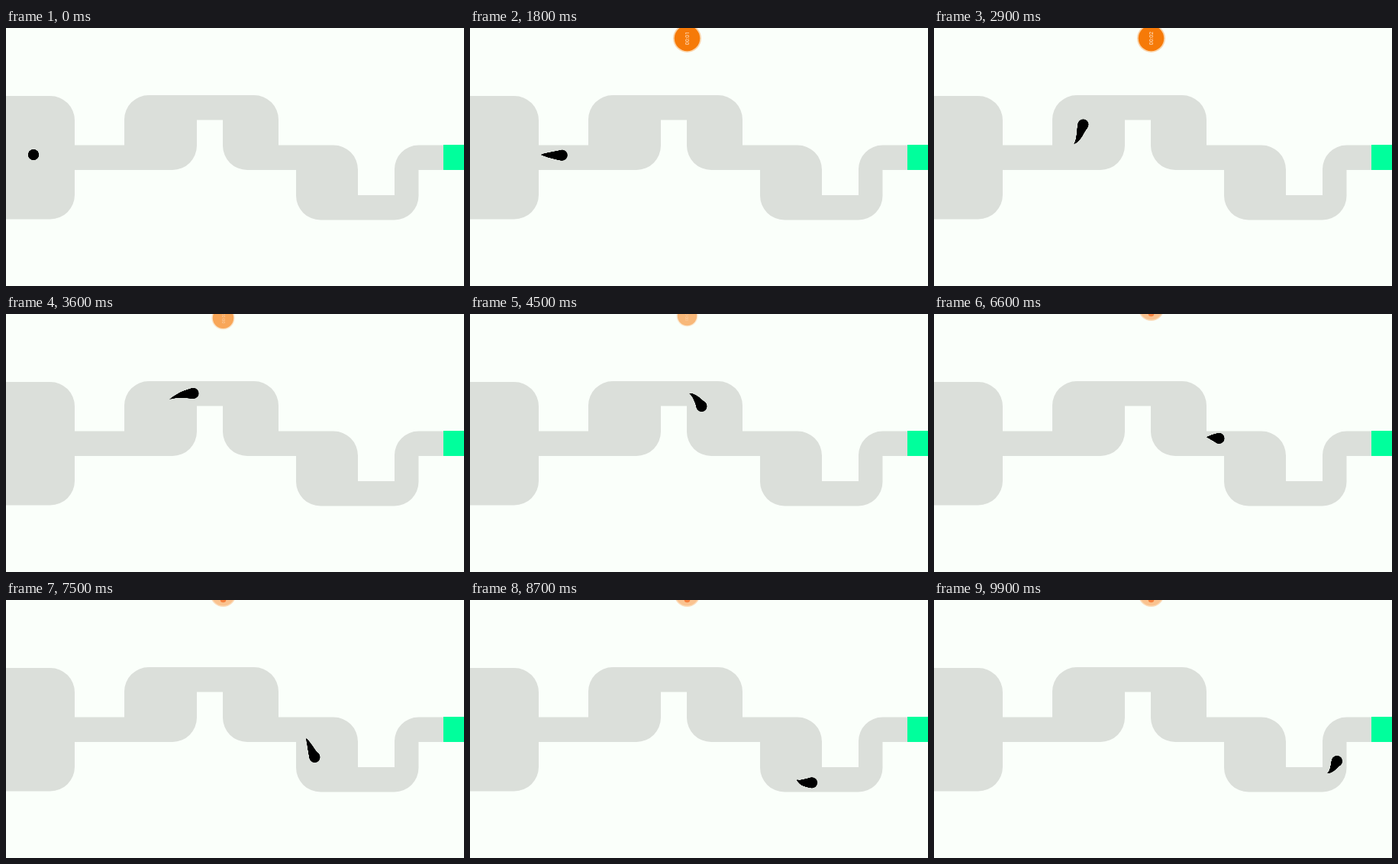
These frames come from a looping animation (600 px wide and 338 px high, 10000 ms). An HTML page with a canvas:

```html
<!DOCTYPE html>
<html lang="en">
<head>
<meta charset="utf-8">
<style>
html, body { margin: 0; width: 100%; height: 100%; overflow: hidden; background: #fafffa; }
canvas { display: block; }
</style>
</head>
<body>
<canvas id="stage" width="600" height="338"></canvas>
<script>
const ctx = document.getElementById('stage').getContext('2d');
const LOOP = 10000, STEP = 100, TRAIL = 400;
const LANE = 32.5, RISE = 65.5, ROUND = 32, TENSION = 0.8;

// each bend: left, right, direction (-1 climbs, 1 descends)
const bends = [[155, 250, -1], [284, 357, 1], [380, 461, 1], [509, 540.5, -1]];

// key points of the ball: time, x, y
const route = [
  [200, 36, 166], [1400, 93, 166], [1900, 128, 166], [2500, 183, 152],
  [3000, 199, 121], [3400, 230, 106], [4100, 287, 104], [4500, 303.5, 121],
  [5300, 321, 153], [5700, 337, 160], [6700, 377, 164], [7100, 393, 181],
  [7500, 404.5, 206], [8500, 436, 239], [9500, 515, 227], [9900, 528, 211]
];

const clamp = (v, a, b) => Math.min(b, Math.max(a, v));
const mix = (a, b, k) => a + (b - a) * k;
const ramp = (t, from, to) => clamp((t - from) / (to - from), 0, 1);

// smooth curve through the route
function place(t) {
  const last = route.length - 1;
  t = clamp(t, route[0][0], route[last][0]);
  let i = 0;
  while (i < last - 1 && t > route[i + 1][0]) i++;
  const a = route[i], b = route[i + 1];
  const before = route[Math.max(0, i - 1)], after = route[Math.min(last, i + 2)];
  const span = b[0] - a[0], u = (t - a[0]) / span;
  const slope = (p, q, n) => TENSION * span * (q[n] - p[n]) / (q[0] - p[0]);
  return [1, 2].map(n => {
    const va = slope(before, b, n), vb = slope(a, after, n), gap = b[n] - a[n];
    return a[n] + u * (va + u * (3 * gap - 2 * va - vb + u * (va + vb - 2 * gap)));
  });
}

function disc(x, y, r, color) {
  ctx.fillStyle = color;
  ctx.beginPath();
  ctx.arc(x, y, r, 0, 7);
  ctx.fill();
}

function drawTrack() {
  let x = 90, y = 153.5;
  ctx.fillStyle = '#dbdfda';
  ctx.beginPath();
  ctx.roundRect(-50, 89, 50 + x, 161.5, ROUND);
  for (const [left, right, dir] of bends) {
    ctx.rect(x, y, left - x, LANE);
    const exit = y + dir * RISE;
    const corners = dir < 0 ? [ROUND, 0] : [0, ROUND];
    ctx.roundRect(left, Math.min(y, exit), right - left, RISE + LANE, [...corners, ...corners]);
    x = right;
    y = exit;
  }
  ctx.rect(x, y, 600 - x, LANE);
  ctx.fill();
  ctx.fillStyle = '#00ff9c';
  ctx.fillRect(573, 153, 27, 33);
}

function drawBall(t) {
  for (let lag = TRAIL; lag >= 0; lag -= 4) {
    const [x, y] = place(t - lag);
    disc(x, y, 6.9 * (1 - lag / TRAIL), '#000');
  }
}

function drawBadge(t) {
  if (t < 700) return;
  const x = 284.5;
  if (t >= 6300) {
    disc(x, -8, 17, '#fbdcba');
    disc(x, -8, 15.5, '#fac390');
    disc(x, -0.5, 3.8, '#f6823f');
    return;
  }
  const tuck = ramp(t, 3300, 3700);
  const scale = mix(1, 0.76, tuck);
  ctx.save();
  ctx.translate(x, mix(13.5, 2.5, tuck));
  ctx.scale(scale, scale);
  ctx.globalAlpha = mix(1, 0.45, tuck);
  disc(0, 0, 18.5, '#fad3a8');
  disc(0, 0, 16.7, '#f67a08');
  ctx.rotate(-Math.PI / 2);
  ctx.fillStyle = '#fff0e0';
  ctx.font = '7px Roboto, sans-serif';
  ctx.textAlign = 'center';
  ctx.textBaseline = 'middle';
  ctx.fillText('00:0' + Math.floor((t - 500) / 1000), 0, 0.5);
  ctx.restore();
}

function frame(now) {
  const t = Math.floor(now % LOOP / STEP) * STEP;
  ctx.fillStyle = '#fafffa';
  ctx.fillRect(0, 0, 600, 338);
  drawTrack();
  drawBall(t);
  drawBadge(t);
  requestAnimationFrame(() => frame(performance.now() - start));
}

const start = performance.now();
frame(0);
</script>
</body>
</html>
```
